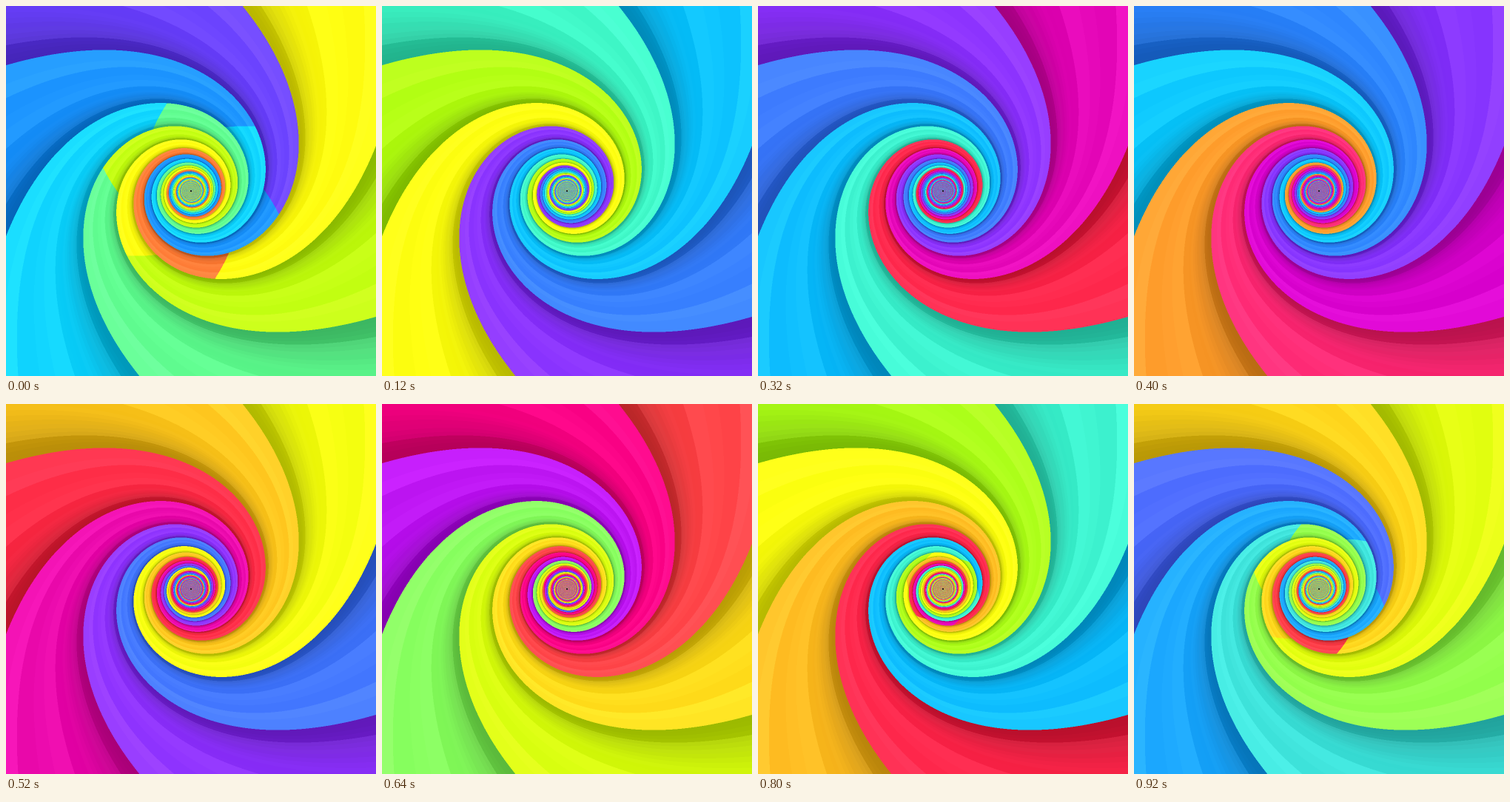
An HTML page with a canvas that plays this animation: 500 by 500 pixels, repeating every 960 ms.

```html
<!DOCTYPE html>
<html lang="en">
<head>
<meta charset="utf-8">
<title>Spiral</title>
<style>
  html, body { margin: 0; width: 100%; height: 100%; overflow: hidden; background: #888; }
  canvas { display: block; width: 500px; height: 500px; }
</style>
</head>
<body>
<canvas id="stage" width="500" height="500"></canvas>
<script>
const SIZE = 500, MID = 250, STEPS = 24, STEP_MS = 40;
const ARMS = 6, ARC = Math.PI / 3;
const REACH = 364, TURN = 0.44;          // arm edges follow angle = TURN + REACH / r
const ARM_HUE = 40, STEP_HUE = 400 / 24, START_HUE = 210;
const LEVELS = 32, SUB = 2;

// Colour wheel: position in degrees, then colour
const wheel = [
  [0, 'ff4c48'], [14, 'ff9030'], [25, 'ffc420'], [37, 'ffdc1a'], [50, 'fffc10'],
  [64, 'fcff10'], [77, 'd8ff10'], [102, 'b0ff14'], [112, '98ff44'], [121, '78ff78'],
  [130, '60fc90'], [141, '3cf6cc'], [152, '42e4d8'], [170, '10d4ff'], [182, '0cc0ff'],
  [193, '1ca8ff'], [210, '1c94ff'], [220, '3880ff'], [232, '4c70ff'], [248, '6448ff'],
  [257, '8834ff'], [268, '9034ff'], [278, 'c410f0'], [297, 'd800cc'], [310, 'f00ca0'],
  [318, 'fc0080'], [335, 'ff2c80'], [344, 'ff2848'], [360, 'ff4c48']
].map(([at, hex]) => [at, [0, 2, 4].map(i => parseInt(hex.substr(i, 2), 16))]);

const mod = (a, b) => ((a % b) + b) % b;

function wheelColour(angle) {
  const a = mod(angle, 360);
  const i = wheel.findIndex(stop => stop[0] > a);
  const [p, from] = wheel[i - 1], [q, to] = wheel[i];
  return from.map((c, n) => c + (to[n] - c) * (a - p) / (q - p));
}

// Shadow beside the inner edge, then faint ridges along the arm
const shades = Array.from({ length: LEVELS }, (_, i) => {
  const u = (i + 0.5) / LEVELS, t = Math.min(1, u / 0.4), band = Math.floor(u * 9);
  return {
    gain: 0.79 + 0.21 * t * t * (3 - 2 * t),
    lift: 20 * (band / 8 - 0.5) + 6 * (band * 5 % 3 - 1)
  };
});

// Arm, shade level and depth of every sample
const count = SIZE * SIZE * SUB * SUB;
const cell = new Uint8Array(count), depth = new Float32Array(count);
let at = 0;
for (let y = 0; y < SIZE; y++) {
  for (let x = 0; x < SIZE; x++) {
    for (let n = 0; n < SUB * SUB; n++, at++) {
      const dx = x + (n % SUB + 0.5) / SUB - MID;
      const dy = y + (Math.floor(n / SUB) + 0.5) / SUB - MID;
      const d = REACH / Math.hypot(dx, dy);
      const s = mod((Math.atan2(dy, dx) - TURN - d) / ARC, ARMS);
      const arm = Math.min(ARMS - 1, Math.floor(s)), u = s - arm;
      cell[at] = mod(2 - arm, ARMS) * LEVELS + Math.min(LEVELS - 1, Math.floor(u * LEVELS));
      depth[at] = d + 0.76 * u;
    }
  }
}

const ctx = document.getElementById('stage').getContext('2d');
const image = ctx.createImageData(SIZE, SIZE);
const half = ARMS * LEVELS;
const table = new Uint8ClampedArray(half * 2 * 3);

// Fills the colour table and returns the mean colour of the inner arms
function fillTable(step, phase) {
  const mean = [0, 0, 0];
  for (let side = 0; side < 2; side++) {
    for (let k = 0; k < ARMS; k++) {
      const j = (k + step) % ARMS;
      const base = wheelColour(START_HUE + STEP_HUE * phase - ARM_HUE * (j - side));
      shades.forEach(({ gain, lift }, i) => {
        const p = (side * half + k * LEVELS + i) * 3;
        for (let c = 0; c < 3; c++) table[p + c] = base[c] * gain + lift;
      });
      if (!side) base.forEach((c, i) => mean[i] += c / ARMS);
    }
  }
  return mean.map(c => Math.round(c * 0.8 + 24));
}

function drawCore(mean) {
  const glow = ctx.createRadialGradient(MID, MID, 0, MID, MID, 19);
  const rgb = mean.join(',');
  glow.addColorStop(0, `rgba(${rgb},.75)`);
  glow.addColorStop(0.6, `rgba(${rgb},.6)`);
  glow.addColorStop(1, `rgba(${rgb},0)`);
  ctx.fillStyle = glow;
  ctx.fillRect(MID - 20, MID - 20, 40, 40);
  ctx.fillStyle = '#222';
  ctx.fillRect(MID - 1, MID - 1, 2, 2);
}

function draw(step) {
  const phase = step < STEPS / 2 ? step : step - STEPS;
  const seam = 3.72 - ARC * phase;       // the colour shift travels outwards
  const mean = fillTable(step, phase);
  const px = image.data, per = SUB * SUB;
  for (let p = 0, s = 0; p < px.length; p += 4) {
    let r = 0, g = 0, b = 0;
    for (let n = 0; n < per; n++, s++) {
      const t = (cell[s] + (depth[s] < seam ? half : 0)) * 3;
      r += table[t];
      g += table[t + 1];
      b += table[t + 2];
    }
    px[p] = r / per;
    px[p + 1] = g / per;
    px[p + 2] = b / per;
    px[p + 3] = 255;
  }
  ctx.putImageData(image, 0, 0);
  drawCore(mean);
}

let shown = -1, start = null;
function tick(now) {
  if (start === null) start = now;
  const step = Math.floor(Math.max(0, now - start) / STEP_MS) % STEPS;
  if (step !== shown) draw(shown = step);
  requestAnimationFrame(tick);
}
draw(shown = 0);
requestAnimationFrame(tick);
</script>
</body>
</html>
```
